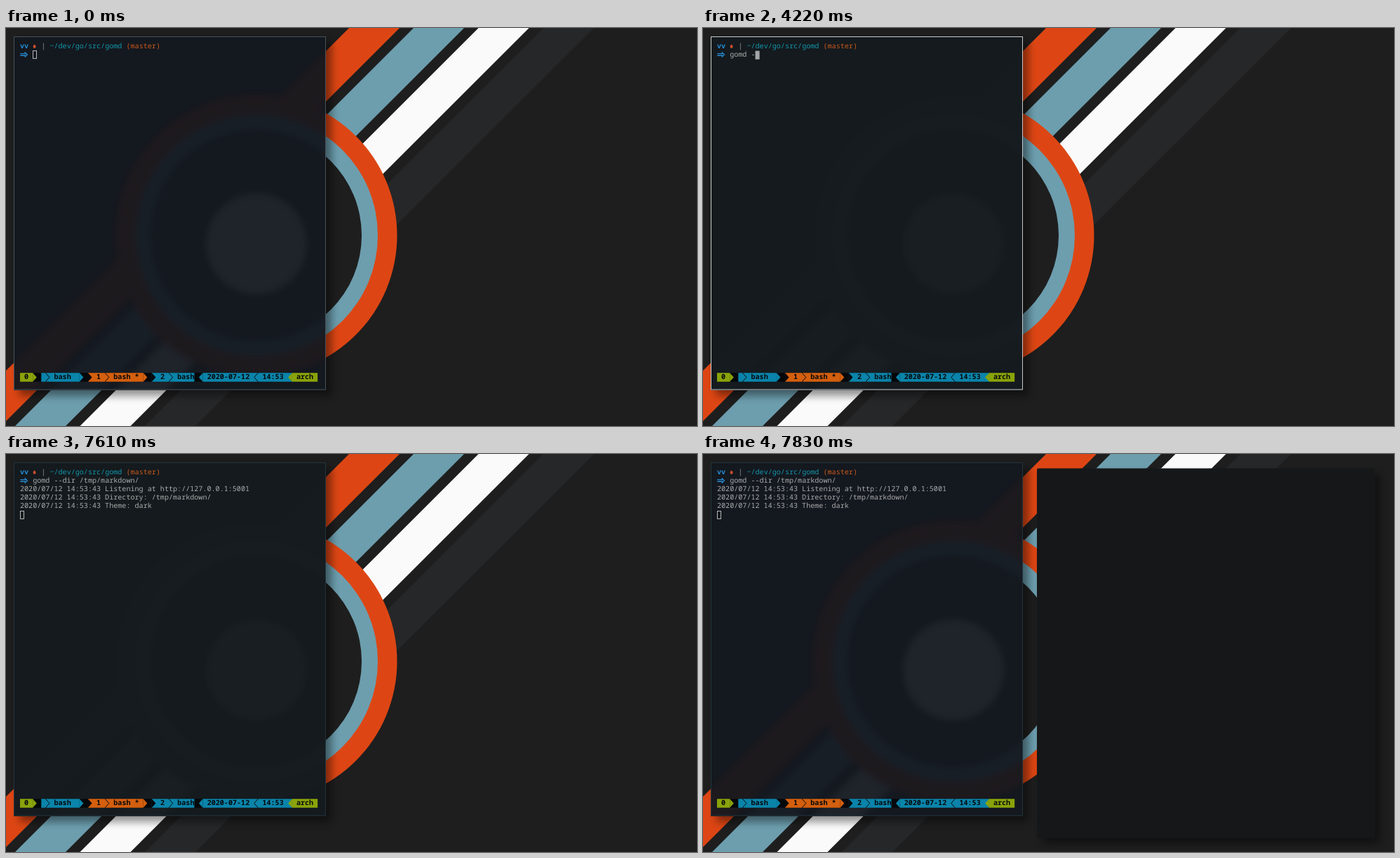
Recreate the animation shown at these times as an HTML page. Size 985 by 568 pixels, loop 8000 ms.

```html
<!DOCTYPE html>
<html lang="en">
<head>
<meta charset="utf-8">
<title>Terminal session</title>
<style>
  html, body { margin: 0; width: 100%; height: 100%; overflow: hidden; background: #1e1e1e; }
  svg { display: block; width: 985px; height: 568px; }
  text {
    font: 10.1px "Noto Sans Mono", "DejaVu Sans Mono", monospace;
    white-space: pre;
    text-rendering: geometricPrecision;
  }
  .bold { font-weight: 700; }
</style>
</head>
<body>
<svg viewBox="0 0 985 568">
  <defs>
    <filter id="soft" filterUnits="userSpaceOnUse" x="0" y="0" width="985" height="568" color-interpolation-filters="sRGB">
      <feGaussianBlur stdDeviation="5"/>
    </filter>
    <filter id="softGray" filterUnits="userSpaceOnUse" x="0" y="0" width="985" height="568" color-interpolation-filters="sRGB">
      <feGaussianBlur stdDeviation="5"/>
      <feColorMatrix type="saturate" values="0"/>
    </filter>
    <filter id="slight" filterUnits="userSpaceOnUse" x="0" y="0" width="985" height="568" color-interpolation-filters="sRGB">
      <feGaussianBlur stdDeviation="2.5"/>
    </filter>
    <filter id="shadow" filterUnits="userSpaceOnUse" x="0" y="0" width="1010" height="600">
      <feGaussianBlur stdDeviation="6"/>
    </filter>
    <clipPath id="termClip"><rect x="11" y="12" width="445" height="505"/></clipPath>
    <clipPath id="pageClip"><rect x="476" y="20.5" width="481.5" height="527.5" rx="2"/></clipPath>
    <g id="wall">
      <rect width="985" height="568" fill="#1e1e1e"/>
      <g id="stripes"></g>
      <circle cx="357" cy="296" r="200.5" fill="#dd4614"/>
      <circle cx="357" cy="296" r="173" fill="#6d9eae"/>
      <circle cx="357" cy="296" r="150" fill="#1e1e1e"/>
      <circle cx="357" cy="308" r="72" fill="#fafafa"/>
    </g>
  </defs>

  <use href="#wall"/>

  <rect x="19" y="20" width="445" height="505" fill="#000" opacity=".42" filter="url(#shadow)"/>
  <g clip-path="url(#termClip)">
    <g id="idleBack">
      <use href="#wall" filter="url(#soft)"/>
      <rect width="985" height="568" fill="#13181f" opacity=".948"/>
    </g>
    <g id="focusBack">
      <use href="#wall" filter="url(#softGray)"/>
      <rect width="985" height="568" fill="#141a1e" opacity=".98"/>
    </g>
  </g>
  <rect id="border" x="11.5" y="12.5" width="444" height="503.5" fill="none"/>

  <g id="prompt">
    <path d="M38.2 26.2L40.6 23.2 43 26.2H42.3V28.4H38.9V26.2Z" fill="#cf4f2a"/>
    <path d="M20.3 36.6H28M20.3 39.2H28M26.6 34.4L30.4 37.9 26.6 41.4" fill="none" stroke="#268bd2" stroke-width="1.4"/>
  </g>
  <g id="output"></g>
  <text id="command" fill="#a9acac"></text>
  <rect id="cursor"></rect>
  <g id="status"></g>

  <g id="page">
    <rect x="484" y="29" width="481" height="527" fill="#000" opacity=".42" filter="url(#shadow)"/>
    <g clip-path="url(#pageClip)">
      <use href="#wall" filter="url(#slight)"/>
    </g>
  </g>
  <rect id="pageFill" x="476" y="20.5" width="481.5" height="527.5" rx="2" fill="#161718"/>
</svg>
<script>
const CELL = 6.06, ROW = 12.1, LEFT = 20, TOP = 20.3, LOOP = 8000;
const $ = id => document.getElementById(id);
const colX = col => LEFT + col * CELL;
const rowY = row => TOP + row * ROW;

function add(parent, tag, attrs, content = '') {
  const node = document.createElementNS('http://www.w3.org/2000/svg', tag);
  set(node, attrs);
  node.textContent = content;
  return parent.appendChild(node);
}
function set(node, attrs) {
  for (const key in attrs) node.setAttribute(key, attrs[key]);
}
function write(parent, col, row, content, fill, cls = '') {
  return add(parent, 'text', { x: colX(col), y: rowY(row) + 8.7, fill, class: cls }, content);
}

// Diagonal wallpaper bands: [x at the top edge, colour]
[[489, '#dd4614'], [581, '#6d9eae'], [673.5, '#fafafa'], [766, '#262729']].forEach(([x, fill]) =>
  add($('stripes'), 'path', { d: `M${x} 0h72l-568 568h-72z`, fill }));

write($('prompt'), 0, 0, 'vv', '#268bd2', 'bold');
write($('prompt'), 5, 0, '|', '#8a9496');
write($('prompt'), 7, 0, '~/dev/go/src/gomd', '#1297ab');
write($('prompt'), 25, 0, '(master)', '#cb5a1c');

['Listening at http://127.0.0.1:5001', 'Directory: /tmp/markdown/', 'Theme: dark'].forEach((line, i) =>
  write($('output'), 0, i + 2, '2020/07/12 14:53:43 ' + line, '#a9acac'));

// Status line
const BAR = 39, BLACK = '#05080b', BLUE = '#0a84aa', ORANGE = '#d45f0e', GREEN = '#8aa30a';
const bar = $('status');
const block = (from, to, fill) => add(bar, 'rect',
  { x: colX(from), y: rowY(BAR), width: (to - from) * CELL, height: 12.6, fill });
// A wedge fills one cell; dir 1 points right, -1 points left.
function wedge(col, dir, attrs, close = 'z') {
  const x = colX(dir > 0 ? col : col + 1), y = rowY(BAR);
  add(bar, 'path', { d: `M${x} ${y}l${dir * 5.6} 6.3l${-dir * 5.6} 6.3${close}`, ...attrs });
}
const chevron = (col, dir) =>
  wedge(col, dir, { fill: 'none', stroke: BLACK, 'stroke-width': 1 }, '');

block(0, 70, BLACK);
[[0, 3, GREEN], [5, 14, BLUE], [16, 29, ORANGE], [31, 41, BLUE], [43, 64, BLUE], [64, 70, GREEN]]
  .forEach(args => block(...args));
[[3, 1, GREEN], [14, 1, BLUE], [16, 1, BLACK], [29, 1, ORANGE], [31, 1, BLACK], [42, -1, BLUE], [63, -1, GREEN]]
  .forEach(([col, dir, fill]) => wedge(col, dir, { fill }));
[[6, 1], [20, 1], [35, 1], [55, -1]].forEach(args => chevron(...args));
[[1, '0'], [8, 'bash'], [18, '1'], [22, 'bash *'], [33, '2'], [37, 'bash'],
 [44, '2020-07-12'], [57, '14:53'], [65, 'arch']]
  .forEach(([col, label]) => write(bar, col, BAR, label, BLACK, 'bold'));

// Steps: [time, value]
const COMMAND = 'gomd --dir /tmp/markdown/';
const typed = [[0, 0], [2540, 1], [2690, 2], [3220, 3], [3380, 4], [3610, 5], [4220, 6],
  [4420, 7], [4510, 8], [4610, 9], [4700, 10], [4910, 11], [5060, 12], [5250, 13],
  [5370, 15], [5490, 16], [6000, 17], [6150, 18], [6380, 25]];
const focus = [[0, 0], [1410, 1], [7610, 0]];
const backFocus = [[0, 0], [1410, .5], [1500, 1], [7660, .6], [7740, 0]];
const borders = [[0, '#465259'], [1410, '#c9cccc'], [7610, '#22353d']];
const fade = [[0, 0], [7660, .3], [7740, .73], [7790, .94], [7830, 1]];
const RUN = 7300;

const at = (steps, t) => steps.findLast(([start]) => start <= t)[1];
set($('command'), { x: colX(3), y: rowY(1) + 8.7 });

function draw(t) {
  const count = at(typed, t), done = t >= RUN, solid = at(focus, t), opacity = at(fade, t);
  $('command').textContent = COMMAND.slice(0, count);
  set($('output'), { visibility: done ? 'visible' : 'hidden' });

  const x = colX(done ? 0 : 3 + count), y = rowY(done ? 5 : 1);
  set($('cursor'), solid
    ? { x, y: y + .2, width: CELL, height: 12.2, fill: '#a4a7a7', stroke: 'none' }
    : { x: Math.round(x) + .5, y: Math.round(y) + .5, width: 5, height: 11, fill: 'none', stroke: '#b4b8b8' });

  set($('border'), { stroke: at(borders, t) });
  set($('focusBack'), { opacity: at(backFocus, t) });
  set($('page'), { opacity: Math.min(1, opacity * 1.4) });
  set($('pageFill'), { opacity });
}

const start = performance.now();
function tick() {
  draw((performance.now() - start) % LOOP);
  requestAnimationFrame(tick);
}
tick();
</script>
</body>
</html>
```
